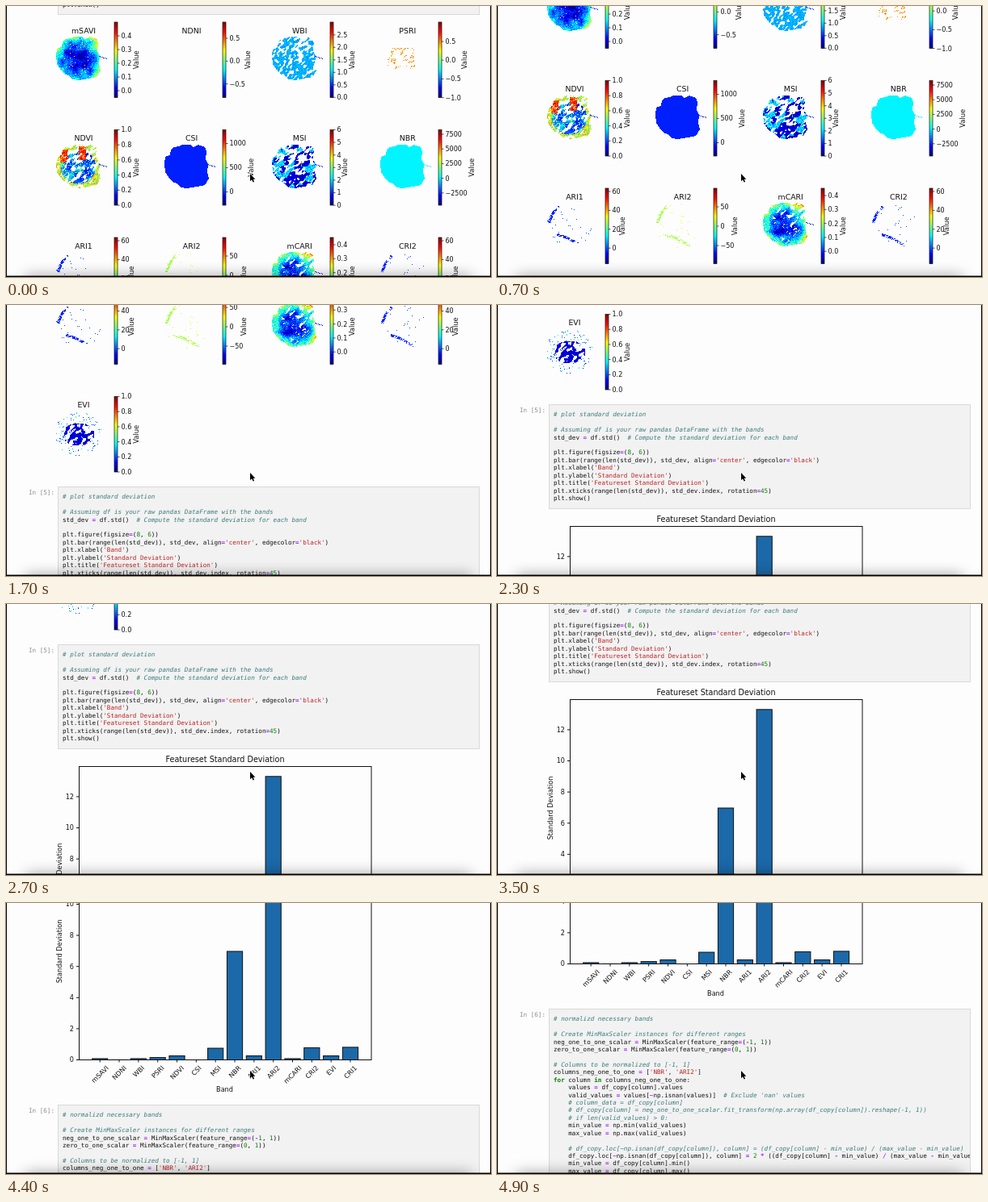
An HTML page with a canvas that plays this animation: 600 px wide and 336 px high, repeating every 5 s.

```html
<!DOCTYPE html>
<html lang="en">
<head>
<meta charset="utf-8">
<title>Notebook scroll</title>
<style>
html, body { margin: 0; width: 100%; height: 100%; overflow: hidden; background: #fdfdfd; }
canvas { display: block; width: 600px; height: 336px; }
</style>
</head>
<body>
<canvas id="stage" width="600" height="336"></canvas>
<script>
const W = 600, H = 336, LOOP = 5000, STEP = 100;
const ctx = document.getElementById('stage').getContext('2d');
const SANS = '"DejaVu Sans", sans-serif';
const MONO = '"DejaVu Sans Mono", monospace';

// Scroll keys: time, offset, speed in px per step
const KEYS = [
  [0, 0, 8], [300, 45, 0], [600, 45, 0], [1000, 191, 34], [1300, 258, 17],
  [1700, 306.5, 11.5], [2200, 390, 19.5], [2700, 481.5, 18], [3100, 540.5, 10],
  [3500, 565, 3], [3700, 568, 0], [3800, 568, 0], [4100, 654, 41],
  [4400, 757.5, 29], [4900, 876.5, 20]
];

function scrollAt(t) {
  let i = 0;
  while (i < KEYS.length - 2 && t > KEYS[i + 1][0]) i++;
  const [t0, y0, v0] = KEYS[i], [t1, y1, v1] = KEYS[i + 1];
  const n = (t1 - t0) / STEP, u = Math.min(1, (t - t0) / (t1 - t0));
  const a = u * u, b = a * u;
  return (2 * b - 3 * a + 1) * y0 + (b - 2 * a + u) * n * v0 +
    (3 * a - 2 * b) * y1 + (b - a) * n * v1;
}

// ---- helpers ----
const clamp = v => Math.max(0, Math.min(1, v));
const mix = (a, b, k) => a + (b - a) * k;

function jet(v) {
  const part = c => Math.round(255 * clamp(1.5 - Math.abs(4 * clamp(v) - c)));
  return `rgb(${part(3)},${part(2)},${part(1)})`;
}

function hash(x, y, seed) {
  const s = Math.sin(x * 127.1 + y * 311.7 + seed * 74.7) * 43758.5453;
  return s - Math.floor(s);
}

function noise(x, y, seed) {
  const i = Math.floor(x), j = Math.floor(y);
  const top = mix(hash(i, j, seed), hash(i + 1, j, seed), x - i);
  const low = mix(hash(i, j + 1, seed), hash(i + 1, j + 1, seed), x - i);
  return mix(top, low, y - j);
}

function label(str, x, y, size, align = 'center', turn = 0) {
  ctx.save();
  ctx.translate(x, y);
  ctx.rotate(turn);
  ctx.font = `${size}px ${SANS}`;
  ctx.fillStyle = '#111';
  ctx.textAlign = align;
  ctx.textBaseline = 'alphabetic';
  ctx.fillText(str, 0, size * 0.365);
  ctx.restore();
}

function line(x0, y0, x1, y1) {
  ctx.beginPath();
  ctx.moveTo(x0, y0);
  ctx.lineTo(x1, y1);
  ctx.stroke();
}

// ---- index maps ----
const FIELD = new Path2D('M0 23L1 15 7 13 8 6 12 3 18 2 22 0 32 0 36 3 42 0 50 3 52 8 51 18 ' +
  '54 24 53 34 55 42 50 50 40 52 28 54 20 53 16 48 10 46 5 40 1 34Z');
const ARCS = [[13, 5, 7, 12], [7, 12, 2, 23], [13, 39, 24, 43], [24, 43, 41, 52]];

function arcDist(x, y) {
  return Math.min(...ARCS.map(([a, b, c, d]) => {
    const k = clamp(((x - a) * (c - a) + (y - b) * (d - b)) / ((c - a) ** 2 + (d - b) ** 2));
    return Math.hypot(x - mix(a, c, k), y - mix(b, d, k));
  }));
}

const inBox = (p, x, y, w, h) => p.x >= x && p.x < x + w && p.y >= y && p.y < y + h;
const arc = v => p =>
  (arcDist(p.x, p.y) < 1.6 && p.m > 0.33 && p.f < 0.75) || (p.d < 1.05 && p.f > 0.99)
    ? v + p.f * 0.06 : null;

// Each rule gives a colour map value, or null for a gap
const RULES = {
  savi: p => p.f > 0.985 ? null
    : 0.08 + 0.32 * p.d ** 2.5 + (p.n - 0.45) * 0.28 + (p.f - 0.5) * 0.16 + (p.y < 17 ? 0.07 : 0),
  wbi: p => p.m > (p.y < 20 ? 0.53 : 0.65) ? null : 0.26 + p.f * 0.07,
  psri: p => inBox(p, 9, 14, 34, 26) && p.m > 0.6 && p.f < 0.5 ? 0.7 + p.f * 0.12 : null,
  ndvi: p => {
    if (inBox(p, 5, 6, 10, 16) || inBox(p, 28, 2, 9, 17)) return p.m > 0.75 ? null : 0.7 + p.f * 0.25;
    if (p.m > (p.y < 22 ? 0.5 : 0.66)) return null;
    return p.d > 0.78 ? 0.42 + p.f * 0.34 : 0.08 + p.n * 0.32 + (p.f > 0.8 ? 0.25 : 0);
  },
  csi: () => 0.155,
  msi: p => p.m > (p.y < 20 ? 0.5 : 0.64) ? null
    : p.n > 0.6 ? 0.25 + p.f * 0.15 : 0.03 + p.f * 0.1,
  nbr: () => 0.365,
  arcBlue: arc(0.14),
  arcGreen: arc(0.52),
  cari: p => p.m > (p.y < 20 ? 0.66 : 0.8) ? null
    : 0.08 + 0.42 * p.d ** 2.2 + (p.n - 0.45) * 0.3 + (p.f - 0.5) * 0.18,
  evi: p => {
    const r = Math.hypot((p.x - 27) / 20, (p.y - 28) / 14);
    if (r < 1 && p.m > 0.42 + r * 0.16) return 0.04 + p.f * 0.1;
    return p.d < 1.05 && p.f > 0.94 ? 0.1 + (p.f - 0.94) * 5 : null;
  }
};
const OPEN = ['arcBlue', 'arcGreen', 'evi'];

function makeMap(rule, seed) {
  const c = document.createElement('canvas');
  c.width = 66;
  c.height = 58;
  const g = c.getContext('2d');
  for (let y = 0; y < 58; y++) for (let x = 0; x < 60; x++) {
    if (!OPEN.includes(rule) && !g.isPointInPath(FIELD, x + 0.5, y + 0.5)) continue;
    const v = RULES[rule]({
      x, y,
      d: Math.hypot((x - 27) / 28, (y - 27) / 27),
      n: noise(x / 6, y / 6, seed),
      m: noise((x - y) / 5 + 40, (x + y) / 2.6, seed + 3),
      f: hash(x, y, seed + 7)
    });
    if (v === null) continue;
    g.fillStyle = jet(v);
    g.fillRect(x, y, 1, 1);
  }
  if (!OPEN.includes(rule) && rule !== 'psri') {
    g.fillStyle = jet(rule === 'nbr' ? 0.365 : 0.16);
    for (let x = 53; x < 63; x++) if (x % 4) g.fillRect(x, Math.round(24 + (x - 53) * 0.3), 1, 1);
  }
  return c;
}

const fix = v => v.toFixed(1).replace('-', '\u2212');
const int = v => String(v).replace('-', '\u2212');

// name, rule, first value, value step, first tick, tick gap, tick count, format, caption offset
const PLOTS = [
  ['mSAVI', 'savi', 0.4, -0.1, 17, 17, 5, fix, 27],
  ['NDNI', '', 0.5, -0.5, 20, 28.3, 3, fix, 30.5],
  ['WBI', 'wbi', 2.5, -0.5, 15.8, 15.5, 6, fix, 27],
  ['PSRI', 'psri', 0.5, -0.5, 24, 23.2, 4, fix, 31.5],
  ['NDVI', 'ndvi', 1, -0.2, 0, 18.7, 6, fix, 27],
  ['CSI', 'csi', 1000, -500, 17, 30, 3, int, 34.5],
  ['MSI', 'msi', 6, -1, 0, 15.6, 7, int, 18],
  ['NBR', 'nbr', 7500, -2500, 5.5, 18.2, 5, int, 41],
  ['ARI1', 'arcBlue', 60, -20, 4, 23.4, 4, int, 21],
  ['ARI2', 'arcGreen', 50, -50, 23, 24, 3, int, 25.5],
  ['mCARI', 'cari', 0.4, -0.1, 9, 17.3, 5, fix, 27],
  ['CRI2', 'arcBlue', 60, -20, 4, 23.4, 4, int, 21],
  ['EVI', 'evi', 1, -0.2, 0, 18.7, 6, fix, 27]
];
const MAPS = PLOTS.map((p, i) => p[1] ? makeMap(p[1], p[1] === 'evi' ? 5 : i + 1) : null);

const BAR_H = 93.5;
const ramp = ctx.createLinearGradient(0, 0, 0, BAR_H);
for (let i = 0; i <= 16; i++) ramp.addColorStop(i / 16, jet(1 - i / 16));

function drawPlot([name, , first, step, tick, gap, count, format, cap], i) {
  const x = 62 + (i % 4) * 133.6, y = 20 + Math.floor(i / 4) * 133.5;
  label(name, x + 34, y + 10.5, 9.4);
  if (MAPS[i]) ctx.drawImage(MAPS[i], Math.round(x), Math.round(y + 18));
  const bx = Math.round(x + 72);
  ctx.save();
  ctx.translate(bx, y);
  ctx.fillStyle = ramp;
  ctx.fillRect(0, 0, 4, BAR_H);
  ctx.strokeStyle = '#111';
  ctx.lineWidth = 0.7;
  ctx.strokeRect(0, 0, 4, BAR_H);
  for (let k = 0; k < count; k++) {
    const ty = tick + k * gap;
    line(4, ty, 6.5, ty);
    label(format(first + step * k + 1e-9 > 99 ? Math.round(first + step * k) : +(first + step * k).toFixed(6)),
      8.5, ty, 8, 'left');
  }
  label('Value', cap, BAR_H / 2, 8.4, 'center', -Math.PI / 2);
  ctx.restore();
}

// ---- code cells ----
const CODE_SIZE = 7.6, LINE = 9.43;
const STD_CODE = `# plot standard deviation

# Assuming df is your raw pandas DataFrame with the bands
std_dev = df.std()  # Compute the standard deviation for each band

plt.figure(figsize=(8, 6))
plt.bar(range(len(std_dev)), std_dev, align='center', edgecolor='black')
plt.xlabel('Band')
plt.ylabel('Standard Deviation')
plt.title('Featureset Standard Deviation')
plt.xticks(range(len(std_dev)), std_dev.index, rotation=45)
plt.show()`;
const NORM_CODE = `# normalizd necessary bands

# Create MinMaxScaler instances for different ranges
neg_one_to_one_scalar = MinMaxScaler(feature_range=(-1, 1))
zero_to_one_scalar = MinMaxScaler(feature_range=(0, 1))

# Columns to be normalized to [-1, 1]
columns_neg_one_to_one = ['NBR', 'ARI2']
for column in columns_neg_one_to_one:
    values = df_copy[column].values
    valid_values = values[~np.isnan(values)]  # Exclude 'nan' values
    # column_data = df_copy[column]
    # df_copy[column] = neg_one_to_one_scalar.fit_transform(np.array(df_copy[column]).reshape(-1, 1))
    # if len(valid_values) > 0:
    min_value = np.min(valid_values)
    max_value = np.max(valid_values)

    # df_copy.loc[~np.isnan(df_copy[column]), column] = (df_copy[column] - min_value) / (max_value - min_value)
    df_copy.loc[~np.isnan(df_copy[column]), column] = 2 * ((df_copy[column] - min_value) / (max_value - min_value)) - 1
    min_value = df_copy[column].min()
    max_value = df_copy[column].max()`;

const TOKEN = /(#.*)|('[^']*')|\b(for|in)\b|([=\-+*\/~]+)|\b(\d+)\b|[A-Za-z_]\w*|\s+|./g;
const INKS = [['italic', '#3d7b7b'], ['', '#ba2121'], ['bold', '#008000'], ['bold', '#a2f'], ['', '#008000']];

function codeLine(str, x, y) {
  ctx.font = `${CODE_SIZE}px ${MONO}`;
  const cw = ctx.measureText('0').width;
  for (const m of str.matchAll(TOKEN)) {
    const kind = m.slice(1).findIndex(Boolean);
    const [style, ink] = INKS[kind] || ['', '#111'];
    ctx.font = `${style} ${CODE_SIZE}px ${MONO}`;
    ctx.fillStyle = ink;
    ctx.fillText(m[0], x + m.index * cw, y);
  }
}

function cell(n, code, top, bottom) {
  ctx.fillStyle = '#f2f2f2';
  ctx.fillRect(64, top, 521.5, bottom - top);
  ctx.strokeStyle = '#d9d9d9';
  ctx.lineWidth = 1;
  ctx.strokeRect(64.5, top + 0.5, 521, bottom - top - 1);
  ctx.textAlign = 'right';
  ctx.font = `${CODE_SIZE}px ${MONO}`;
  ctx.fillStyle = '#8c8c8c';
  ctx.fillText(`In [${n}]:`, 60, top + 10.3);
  ctx.textAlign = 'left';
  ctx.save();
  ctx.beginPath();
  ctx.rect(64, top, 521, bottom - top);
  ctx.clip();
  code.split('\n').forEach((s, i) => codeLine(s, 70, top + 15.3 + i * LINE));
  ctx.restore();
}

// ---- bar chart ----
const CHART = { left: 90, right: 452, top: 683.5, base: 952.5, unit: 19.3 };
const BANDS = {
  mSAVI: 0.08, NDNI: 0.005, WBI: 0.08, PSRI: 0.15, NDVI: 0.26, CSI: 0, MSI: 0.75, NBR: 6.97,
  ARI1: 0.26, ARI2: 13.3, mCARI: 0.08, CRI2: 0.78, EVI: 0.26, CRI1: 0.81
};

function drawChart() {
  const { left, right, top, base, unit } = CHART;
  label('Featureset Standard Deviation', 271, 674.5, 9.65);
  ctx.strokeStyle = '#111';
  ctx.lineWidth = 1;
  Object.entries(BANDS).forEach(([name, v], i) => {
    const x = 116.2 + i * 23.83, h = v * unit;
    ctx.fillStyle = '#1b69a9';
    ctx.fillRect(x - 9.6, base - h, 19.2, h);
    if (v) ctx.strokeRect(x - 9.6, base - h, 19.2, h);
    line(x, base, x, base + 3);
    ctx.font = `8.1px ${SANS}`;
    const half = (ctx.measureText(name).width + 7) * 0.3536;
    label(name, x, base + 6 + half, 8.1, 'center', -Math.PI / 4);
  });
  ctx.strokeRect(left + 0.5, top, right - left - 0.5, base - top);
  for (let v = 0; v <= 12; v += 2) {
    const y = base - v * unit;
    line(left - 3, y, left, y);
    label(String(v), 84, y, 8.1, 'right');
  }
  label('Standard Deviation', 66, (top + base) / 2, 8.17, 'center', -Math.PI / 2);
  label('Band', 270.5, 989.5, 8.1);
}

// ---- fixed overlay ----
const ARROW = new Path2D('M302 208V217.2L304.1 215.3 305.6 218.6 307.1 217.9 305.7 214.8H308.4Z');

function drawOverlay() {
  ctx.save();
  ctx.shadowColor = 'rgba(0,0,0,0.45)';
  ctx.shadowBlur = 18;
  ctx.fillStyle = '#000';
  ctx.fillRect(24, H, W - 48, 12);
  ctx.restore();
  ctx.fillStyle = '#000';
  ctx.fillRect(0, 0, 1, H);
  ctx.fillRect(W - 1, 0, 1, H);
  ctx.fillRect(0, H - 1.5, W, 1.5);
  ctx.strokeStyle = '#fff';
  ctx.lineWidth = 1.2;
  ctx.stroke(ARROW);
  ctx.fill(ARROW);
}

function draw(t) {
  ctx.fillStyle = '#fdfdfd';
  ctx.fillRect(0, 0, W, H);
  ctx.save();
  ctx.translate(0, -Math.round(scrollAt(t)));
  cell(4, Array(11).fill('').concat('plt.show()').join('\n'), -118, 11);
  PLOTS.forEach(drawPlot);
  cell(5, STD_CODE, 532, 662);
  drawChart();
  cell(6, NORM_CODE, 1008, 1260);
  ctx.restore();
  drawOverlay();
}

const start = performance.now();
function tick() {
  const t = (performance.now() - start) % LOOP;
  draw(Math.floor(t / STEP) * STEP);
  requestAnimationFrame(tick);
}
tick();
</script>
</body>
</html>
```
